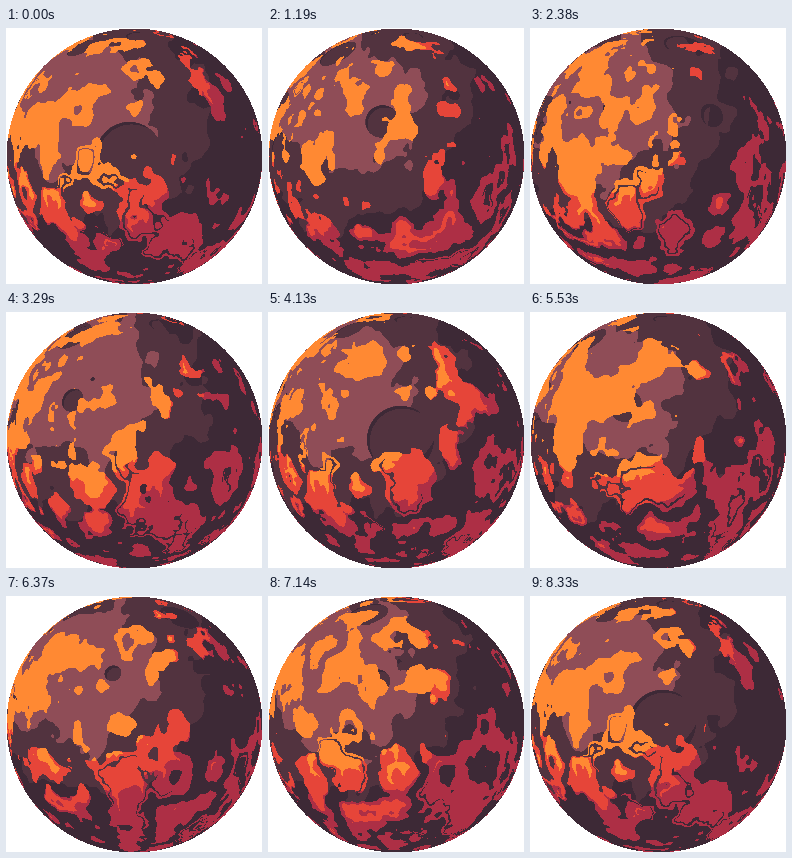
Recreate the animation shown at these times as an HTML page with a canvas. Size 256 by 256 pixels, loop 8400 ms.

```html
<!DOCTYPE html>
<html lang="en">
<head>
<meta charset="utf-8">
<title>Lava planet</title>
<style>
  html, body { margin: 0; width: 100%; height: 100%; overflow: hidden; background: #fff; }
  canvas { display: block; width: 256px; height: 256px; }
</style>
</head>
<body>
<canvas id="planet" width="256" height="256"></canvas>
<script>
const SIZE = 256, STEPS = 120, STEP_MS = 70;
const SEED = 7.75;
const LIGHT = 0.3;            // light origin, same on both axes
const NOISE_SCALE = 10, CRATER_SCALE = 3.5, CRATER_TILE = 4;
const RIVER_CUTOFF = 0.579;

const ctx = document.getElementById('planet').getContext('2d');
const image = ctx.createImageData(SIZE, SIZE);
const out = new Uint32Array(image.data.buffer);

const abgr = rgb => (0xff000000 | (rgb & 255) << 16 | (rgb & 0xff00) | rgb >> 16) >>> 0;
const LAND = [0x8f4d57, 0x52333f, 0x3d2936].map(abgr);
const LAVA = [0xff8933, 0xe64539, 0xad2f45].map(abgr);

// Random lattice that repeats every w by h cells
function lattice(w, h) {
  const cells = new Float64Array(w * h);
  for (let y = 0; y < h; y++) {
    for (let x = 0; x < w; x++) {
      const v = Math.sin(x * 12.9898 + y * 78.233) * 15.5453 * SEED;
      cells[y * w + x] = v - Math.floor(v);
    }
  }
  return cells;
}

function makeFbm(w, h, octaves) {
  const cells = lattice(w, h);
  function noise(x, y) {
    const ix = Math.floor(x), iy = Math.floor(y);
    const fx = x - ix, fy = y - iy;
    const sx = fx * fx * (3 - 2 * fx), sy = fy * fy * (3 - 2 * fy);
    const x0 = ix % w, x1 = (ix + 1) % w;
    const r0 = (iy % h) * w, r1 = ((iy + 1) % h) * w;
    const top = cells[r0 + x0] + (cells[r0 + x1] - cells[r0 + x0]) * sx;
    const bottom = cells[r1 + x0] + (cells[r1 + x1] - cells[r1 + x0]) * sx;
    return top + (bottom - top) * sy;
  }
  return (x, y) => {
    let sum = 0;
    for (let i = 0, amp = 0.5; i < octaves; i++, amp /= 2, x *= 2, y *= 2) {
      sum += noise(x, y) * amp;
    }
    return sum;
  };
}

const landFbm = makeFbm(NOISE_SCALE, NOISE_SCALE, 3);
const riverFbm = makeFbm(NOISE_SCALE * 2, NOISE_SCALE, 4);
const craterCells = lattice(CRATER_TILE, CRATER_TILE);

// 0 inside the round pit of a cell, 1 outside
function pit(x, y) {
  const row = Math.floor(y);
  x += row * 0.31;
  const col = Math.floor(x);
  const h = craterCells[(row % CRATER_TILE) * CRATER_TILE + col % CRATER_TILE];
  const centre = 0.25 + h * 0.5, r = h * 0.25;
  const m = Math.hypot(x - col - centre, y - row - centre);
  if (m >= r) return 1;
  const t = Math.max(0, (m - 0.9 * r) / (0.1 * r));
  return t * t * (3 - 2 * t);
}

function crater(u, v, scroll) {
  const x = u * CRATER_SCALE + scroll, y = v * CRATER_SCALE;
  return 1 - pit(x + 11, y + 11) * pit(x + 12, y + 12);
}

// Everything about a pixel that does not depend on time
const pixels = [];
for (let py = 0; py < SIZE; py++) {
  for (let px = 0; px < SIZE; px++) {
    const x = px / SIZE, y = py / SIZE;
    if (Math.hypot(x - 0.5, y - 0.5) > 0.49999) continue;
    const cx = x * 2 - 1, cy = y * 2 - 1;
    const bulge = 1 + Math.sqrt(Math.max(0, 1 - cx * cx - cy * cy));
    pixels.push({
      at: py * SIZE + px, x, y,
      u: cx / bulge * 0.5 + 0.5,
      v: cy / bulge * 0.5 + 0.5,
      light: Math.hypot(x - LIGHT, y - LIGHT),
      warp: landFbm(x, y)
    });
  }
}

const pick = (colors, value, mid, dark) => colors[value > dark ? 2 : value > mid ? 1 : 0];

function shade(p, turn) {
  const scroll = turn * NOISE_SCALE * 2;

  const base = riverFbm(p.u * NOISE_SCALE + scroll, p.v * NOISE_SCALE) * 2.5;
  const river = riverFbm(p.u + base, p.v + base);
  if (river >= RIVER_CUTOFF) {
    return pick(LAVA, p.light * p.light * 0.4 * (1 - river), 0.019, 0.036);
  }

  const craterScroll = turn * CRATER_TILE * 2;
  const depth = crater(p.u, p.v, craterScroll);
  if (depth >= 0.5) {
    const shift = (LIGHT - 0.5) * 0.03;
    const rim = crater(p.u + shift, p.v + shift, craterScroll);
    const shadow = rim < depth - (0.5 - p.light) * 2;
    return LAND[shadow || p.light > 0.4 ? 2 : 1];
  }

  const relief = landFbm(p.x * NOISE_SCALE + p.warp + scroll, p.y * NOISE_SCALE + p.warp);
  return pick(LAND, p.light + relief * 0.3, 0.404, 0.604);
}

let shown = -1;
function frame() {
  const step = Math.floor(performance.now() / STEP_MS) % STEPS;
  if (step !== shown) {
    shown = step;
    for (const p of pixels) out[p.at] = shade(p, step / STEPS);
    ctx.putImageData(image, 0, 0);
  }
  requestAnimationFrame(frame);
}
frame();
</script>
</body>
</html>
```
